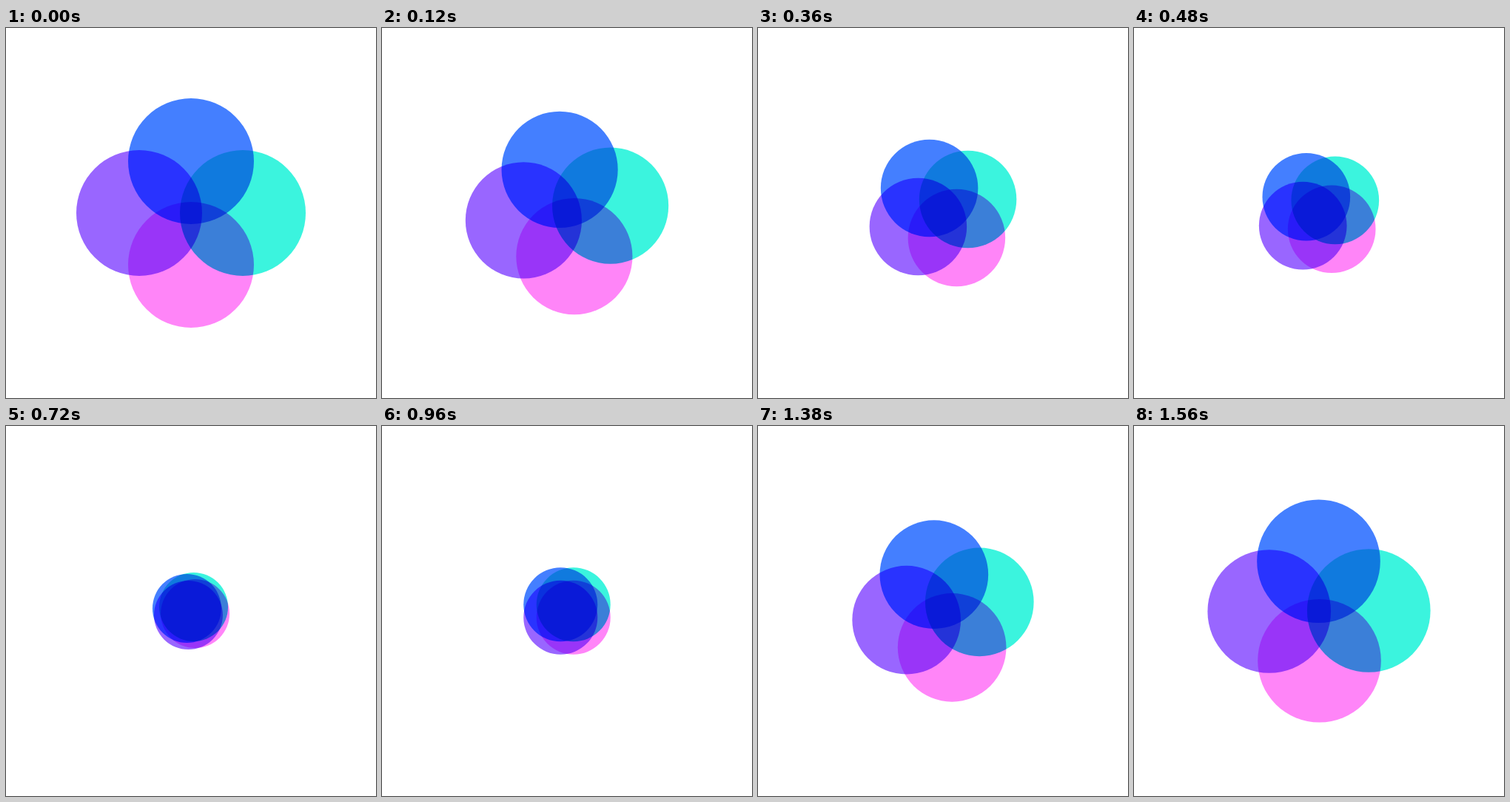
Animation, 500 px wide and 500 px high, one loop 1590 ms. Source, as an HTML page with a canvas:

```html
<!DOCTYPE html>
<html lang="en">
<head>
<meta charset="utf-8">
<title>Merging circles</title>
<style>
  html, body { margin: 0; width: 100%; height: 100%; overflow: hidden; background: #fff; }
  canvas { display: block; }
</style>
</head>
<body>
<canvas id="stage" width="500" height="500"></canvas>
<script>
const ctx = document.getElementById('stage').getContext('2d');
const STEP = 30, STEPS = 53;
const COLORS = ['#447fff', '#3bf4de', '#ff85f8', '#9966ff']; // top, right, bottom, left

// Tracks of [step, value], linear in between
const SPREAD = [[0, 1], [26.5, 0], [27.5, 0], [53, 1]];
const TURN = [[0, 0], [25.2, 60.3], [52.2, 0], [53, 0]];

function sample(track, x) {
  let i = 1;
  while (i < track.length - 1 && x > track[i][0]) i++;
  const [x0, a] = track[i - 1], [x1, b] = track[i];
  return a + (b - a) * (x - x0) / (x1 - x0);
}

function draw(step) {
  const spread = sample(SPREAD, step);
  const turn = sample(TURN, step) * Math.PI / 180;
  const dist = 70 * spread;
  const radius = 42.5 * (1 + spread);

  ctx.globalCompositeOperation = 'source-over';
  ctx.fillStyle = '#fff';
  ctx.fillRect(0, 0, 500, 500);
  ctx.globalCompositeOperation = 'multiply';
  COLORS.forEach((color, i) => {
    const angle = (i - 1) * Math.PI / 2 - turn;
    ctx.fillStyle = color;
    ctx.beginPath();
    ctx.arc(250 + dist * Math.cos(angle), 250 + dist * Math.sin(angle), radius, 0, 2 * Math.PI);
    ctx.fill();
  });
}

const start = performance.now();
function tick() {
  const elapsed = performance.now() - start;
  draw(Math.floor(elapsed / STEP) % STEPS);
  requestAnimationFrame(tick);
}
tick();
</script>
</body>
</html>
```
